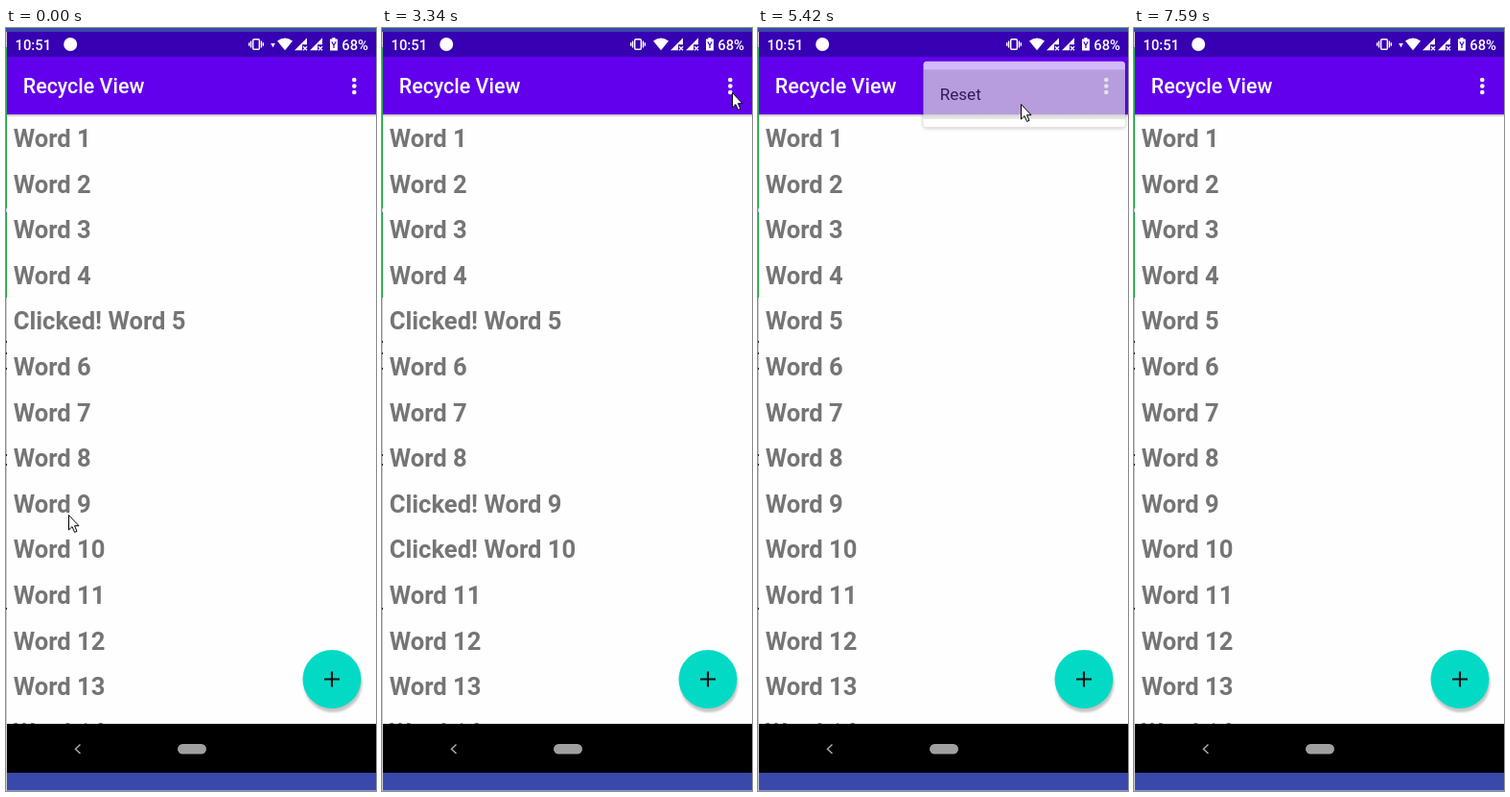
Animation of 386 by 795 pixels, one loop 8300 ms. Source, as an HTML page:

```html
<!DOCTYPE html>
<html lang="en">
<head>
<meta charset="utf-8">
<title>Recycle View</title>
<style>
  html, body { margin: 0; width: 100%; height: 100%; overflow: hidden; background: #fefefe; }
  svg { display: block; width: 100%; height: 100%; font-family: Roboto, sans-serif; }
  #words { font-weight: 700; font-size: 25.6px; fill: #757575; }
  .status { font-weight: 500; font-size: 14.8px; fill: #fff; }
  .title { font-weight: 500; font-size: 21.4px; fill: #fff; }
  .item { font-size: 17.1px; fill: #212121; }
  #menu { filter: drop-shadow(0 1px 2px #0005); }
</style>
</head>
<body>
<svg viewBox="0 0 386 795">
  <defs>
    <linearGradient id="edge" x2="0" y2="1">
      <stop stop-color="#bbb"/><stop offset="1" stop-color="#fefefe"/>
    </linearGradient>
    <filter id="soft" x="-20%" y="-20%" width="140%" height="140%"><feGaussianBlur stdDeviation="1.3"/></filter>
    <g id="signal" fill="#fff">
      <path d="M0 13 13 0V7H8V13Z"/>
      <path d="M9 9l4 4m0-4l-4 4" stroke="#fff" stroke-width="1.3"/>
    </g>
  </defs>

  <rect width="386" height="795" fill="#fefefe"/>
  <g id="words"></g>

  <!-- Floating button -->
  <circle cx="341" cy="682.5" r="30.5" fill="#000" opacity=".22" filter="url(#soft)"/>
  <circle cx="340" cy="678.5" r="30.5" fill="#03dac5"/>
  <path d="M332 678.5h16m-8-8v16" stroke="#111" stroke-width="2.1"/>

  <!-- Bars -->
  <rect width="386" height="4" fill="#3949ab"/>
  <rect y="4" width="386" height="26" fill="#3700b3"/>
  <rect y="30" width="386" height="60" fill="#6200ee"/>
  <rect y="90" width="386" height="3" fill="url(#edge)"/>
  <rect y="725" width="386" height="51" fill="#000"/>
  <rect y="776" width="386" height="18" fill="#3949ab"/>
  <rect y="794" width="386" height="1" fill="#8b94c8"/>
  <path d="M77.5 746.5 72.5 751.2 77.5 756" fill="none" stroke="#aaa" stroke-width="1.5"/>
  <rect x="179" y="746" width="30" height="10.5" rx="5.25" fill="#a0a0a0"/>

  <!-- Window edge on the left -->
  <path d="M.5 4V795" stroke="#ccc"/>
  <path d="M.5 20V188M.5 192V281" stroke="#22a84a"/>
  <path d="M.5 326v2m0 10v2m0 14v2m0 88v2m0 8v2m0 148v2" stroke="#222"/>

  <!-- Status bar -->
  <text class="status" x="9.5" y="22.6">10:51</text>
  <circle cx="67.2" cy="17" r="7" fill="#fff"/>
  <g id="vibrate" fill="none" stroke="#fff" stroke-width="1.4">
    <rect x="-3.3" y="11.7" width="6.6" height="10.6" rx="1"/>
    <path d="M-5.4 13.5v7M5.4 13.5v7M-7.3 15.3v3.4M7.3 15.3v3.4"/>
  </g>
  <path id="arrow" d="M-2.3 16h4.6L0 20.2Z" fill="#fff"/>
  <path id="wifi" d="M-8 13.5Q0 7.5 8 13.5L0 23.3Z" fill="#fff"/>
  <use href="#signal" x="301" y="10.3"/>
  <use href="#signal" x="317" y="10.3"/>
  <path d="M338 11.5h2.3V10h3.2v1.5h2.4V23.5H338Z" fill="#fff"/>
  <path d="M339.8 14.2 342 18l2.2-3.8M342 17.5V21" fill="none" stroke="#3700b3" stroke-width="1.2"/>
  <text class="status" x="350.3" y="22.6">68%</text>

  <!-- App bar -->
  <text class="title" x="17.8" y="68.4">Recycle View</text>
  <g fill="#fff">
    <circle cx="363.3" cy="54" r="2.3"/>
    <circle cx="363.3" cy="60.5" r="2.3"/>
    <circle cx="363.3" cy="67" r="2.3"/>
  </g>

  <g id="menu">
    <rect x="172.5" y="34.8" width="210.5" height="68.5" rx="3.5" fill="#fff"/>
    <rect id="press" x="172.5" y="43.3" width="210.5" height="51.5" fill="#000" opacity=".15"/>
    <text class="item" x="189.7" y="75.4">Reset</text>
  </g>

  <path id="cursor" d="M.5.5V16L4 12.6 6.6 18.4 9 17.4 6.5 11.7H11Z" fill="#fff" stroke="#000"/>
</svg>
<script>
const LOOP = 8300;
const $ = id => document.getElementById(id);

const words = Array.from({ length: 14 }, (_, i) => {
  const word = document.createElementNS("http://www.w3.org/2000/svg", "text");
  word.setAttribute("x", 7.7);
  word.setAttribute("y", 123.9 + i * 47.6);
  $("words").append(word);
  return word;
});

// Each move advances in even steps along a quadratic curve.
const moves = [
  { start: 930, end: 1920, steps: 8, path: [[65, 507], [243, -30], [99, 539]] },
  { start: 2560, end: 3340, steps: 7, path: [[99, 539], [232, 303], [365, 67]] },
  { start: 4380, end: 4840, steps: 4, path: [[365, 67], [320, 76], [274, 79]] },
  { start: 6210, end: 7170, steps: 8, path: [[274, 79], [144, 406], [294, 733]] },
  { start: 7320, end: 7590, steps: 3, path: [[294, 733], [315, 768], [336, 800]] }
];

// Last entry of [time, value] pairs that has been reached.
const at = (track, t) => track.findLast(([time]) => t >= time)[1];

const menuOpacity = [[0, 0], [3930, .5], [4080, 1], [5420, .72], [5540, 0]];

// Positions of the vibrate, activity arrow and wifi icons.
const busy = [261, 278.5, 291], idle = [267, null, 291], shifted = [267, 284.5, 297.5];
const statusIcons = [[0, busy], [2950, idle], [5690, shifted], [5840, busy]];

function cursorAt(t) {
  const { start, end, steps, path: [a, b, c] } = moves.findLast(m => t >= m.start) || moves[0];
  const done = Math.floor((t - start) / (end - start) * (steps - 1) + 1e-6) + 1;
  const p = Math.max(0, Math.min(1, done / steps)), q = 1 - p;
  return [0, 1].map(i => Math.round(q * q * a[i] + 2 * p * q * b[i] + p * p * c[i]));
}

const isClicked = (n, t) =>
  t < 5420 && (n === 5 || n === 9 && t >= 530 || n === 10 && t >= 2290);

function place(id, x, y = 0) {
  $(id).setAttribute("transform", `translate(${x} ${y})`);
}

function draw(t) {
  words.forEach((word, i) => {
    const label = (isClicked(i + 1, t) ? "Clicked! " : "") + "Word " + (i + 1);
    if (word.textContent !== label) word.textContent = label;
  });

  const [vibrate, arrow, wifi] = at(statusIcons, t);
  place("vibrate", vibrate);
  place("arrow", arrow ?? -20);
  place("wifi", wifi);

  $("menu").style.opacity = at(menuOpacity, t);
  $("press").style.display = t >= 5270 ? "" : "none";
  place("cursor", ...cursorAt(t));
}

function frame() {
  draw(performance.now() % LOOP);
  requestAnimationFrame(frame);
}
frame();
</script>
</body>
</html>
```
